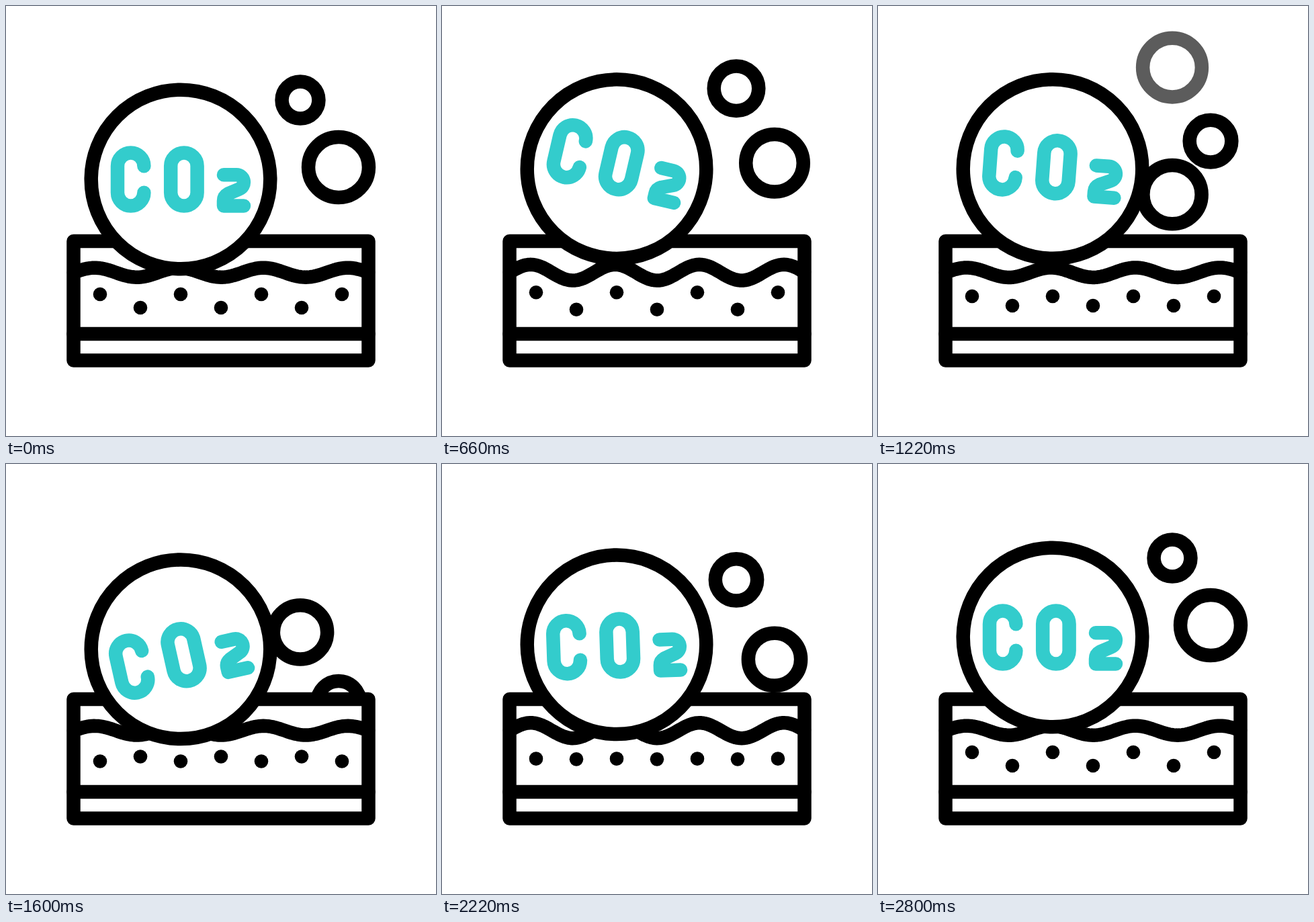
These frames come from a looping animation (640 px wide and 640 px high, 3000 ms). An HTML page:

```html
<!DOCTYPE html>
<html>
<head>
<meta charset="utf-8">
<style>
html, body { margin: 0; width: 100%; height: 100%; overflow: hidden; background: #fff; }
svg { display: block; width: 100vw; height: 100vh; fill: none; stroke: #000; stroke-width: 20.5; stroke-linecap: round; stroke-linejoin: round; }
</style>
</head>
<body>
<svg viewBox="0 0 640 640">
  <g fill="#fff">
    <circle id="smallOut" cx="438"/>
    <circle id="bigOut" cx="495"/>
    <circle id="smallIn" cx="438"/>
    <circle id="bigIn" cx="495"/>
    <path d="M100.5 350H539.5V527.5H100.5Z"/>
  </g>
  <path d="M100.5 488H539.5"/>
  <path id="wave"/>
  <g id="dots" fill="#000" stroke="none"></g>
  <circle id="ball" cx="260" r="133.3" fill="#fff"/>
  <g id="label" stroke="#3cc">
    <path d="M205.4 238.2a19.7 19.7 0 0 0-39.4 0V277.8a19.7 19.7 0 0 0 39.4 0"/>
    <rect x="245.2" y="218.5" width="39.4" height="79" rx="19.7"/>
    <path d="M324 251.3H343A11 11 0 0 1 347 272.5L330.5 279.5Q324 283 324 290V297.5H354"/>
  </g>
</svg>
<script>
const LOOP = 3000;
const $ = id => document.getElementById(id);
const set = (el, attrs) => { for (const k in attrs) el.setAttribute(k, attrs[k]); };

// Eased value at time t through [time, value] pairs
function ease(t, ...keys) {
  if (t <= keys[0][0]) return keys[0][1];
  for (let i = 1; i < keys.length; i++) {
    const [t0, a] = keys[i - 1], [t1, b] = keys[i];
    if (t < t1) {
      const u = (t - t0) / (t1 - t0);
      return a + (b - a) * u * u * (3 - 2 * u);
    }
  }
  return keys[keys.length - 1][1];
}
const fade = (t, from, to) => Math.max(0, Math.min(1, (to - t) / (to - from)));

const dots = Array.from({ length: 7 }, (_, i) => {
  const dot = document.createElementNS('http://www.w3.org/2000/svg', 'circle');
  set(dot, { cx: 140 + 60 * i, r: 10.3 });
  return $('dots').appendChild(dot);
});

function wavePath(amp) {
  let d = '';
  for (let x = 101; x <= 539; x += 3) {
    const y = 396.7 - amp * Math.cos((x - 132) / 125.6 * 2 * Math.PI);
    d += (d ? 'L' : 'M') + x + ' ' + y.toFixed(2);
  }
  return d;
}

function bubble(id, cy, outer, opacity) {
  set($(id), { cy, r: outer - 10.25, opacity });
}

function draw(t) {
  // Leaving bubbles: one grows, the other shrinks, both fade at the top
  const s = ease(t, [200, 0], [1380, 1]);
  bubble('smallOut', 140 - 51 * s, 37.7 + 17.3 * s, fade(t, 1130, 1380));
  const b = ease(t, [400, 0], [1580, 1]);
  bubble('bigOut', 240 - 50 * b, 55.2 - 17.5 * b, fade(t, 1330, 1580));

  // New bubbles rise from behind the tank
  const sy = ease(t, [920, 420], [1100, 283], [2720, 140]);
  bubble('smallIn', sy, Math.min(54, 37.7 + (sy - 140) * .115), t < 920 ? 0 : 1);
  const by = ease(t, [1400, 400], [1540, 355.5], [2800, 240]);
  bubble('bigIn', by, 55.2 - (by - 240) * .115, t < 1400 ? 0 : 1);

  const amp = ease(t, [200, 7], [860, 13.2], [1410, 5], [2000, 12.5], [2800, 7]);
  set($('wave'), { d: wavePath(amp) });

  const swing = ease(t, [200, 10], [850, 13.4], [1800, -5.6], [2800, 10]);
  dots.forEach((dot, i) => set(dot, { cy: 439 + (i % 2 ? swing : -swing) }));

  const dy = ease(t, [200, 0], [1000, -25], [1790, 25], [2580, 0]);
  const turn = ease(t, [200, 0], [850, 16.5], [1700, -13.8], [2380, 0]);
  set($('ball'), { cy: 258 + dy });
  set($('label'), { transform: `translate(0 ${dy}) rotate(${turn} 303 264)` });
}

const start = performance.now();
function tick() {
  draw((performance.now() - start) % LOOP);
  requestAnimationFrame(tick);
}
tick();
</script>
</body>
</html>
```
